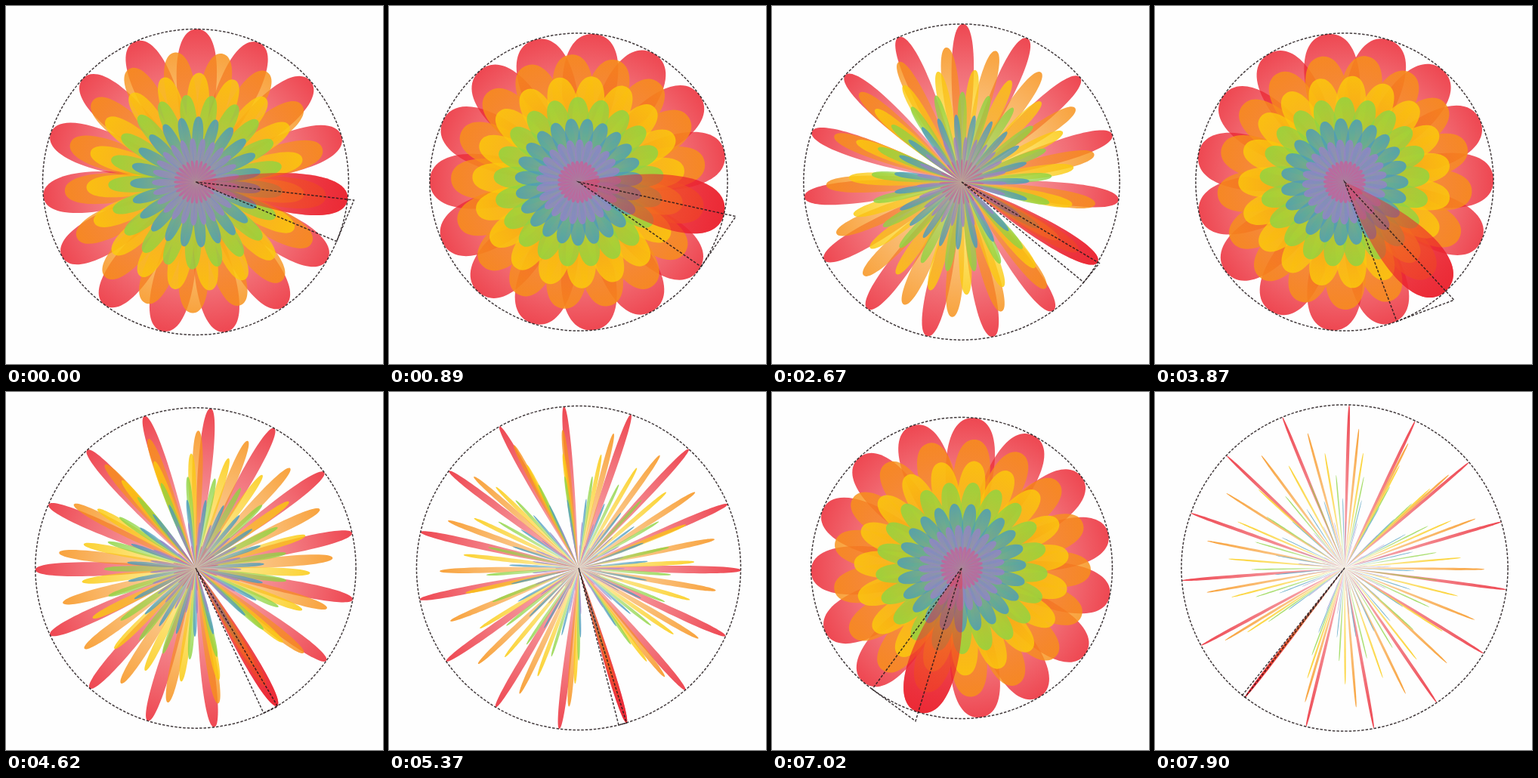
Animation of 499x474 px, one loop 8 s. Source, as an HTML page with a canvas:

```html
<!DOCTYPE html>
<html lang="en">
<head>
<meta charset="utf-8">
<title>Petal wheel</title>
<style>
  html, body { margin: 0; width: 100%; height: 100%; overflow: hidden; background: #fefefe; }
  canvas { display: block; }
</style>
</head>
<body>
<canvas id="stage" width="499" height="474"></canvas>
<script>
const ctx = document.getElementById('stage').getContext('2d');
const RAD = Math.PI / 180;
const LOOP = 8000;

// One colour per layer, outermost first
const COLORS = [
  '235,36,48', '247,145,24', '251,202,12', '142,212,66',
  '72,154,190', '150,130,200', '198,96,152'
];

// Step number at time t: 150 ms steps, a few of them 10 ms shorter
function stepAt(t) {
  const short = [0, 1180, 2370, 7760, 7900].filter(s => t >= s).length;
  return Math.floor((t + 10 * short) / 150);
}

// Teardrop along the x axis, as seen from the wheel's centre
function petal(angle, length, spread, fill) {
  const w = length * Math.tan(spread);
  ctx.save();
  ctx.rotate(angle);
  ctx.beginPath();
  ctx.moveTo(0, 0);
  ctx.bezierCurveTo(.6 * length, .64 * w, length, .56 * w, length, 0);
  ctx.bezierCurveTo(length, -.56 * w, .6 * length, -.64 * w, 0, 0);
  ctx.fillStyle = fill;
  ctx.fill();
  ctx.restore();
}

function fade(rgb, length) {
  const g = ctx.createRadialGradient(0, 0, 0, 0, 0, length);
  [[0, .28], [.4, .5], [.7, .66], [1, .84]]
    .forEach(([at, alpha]) => g.addColorStop(at, `rgba(${rgb},${alpha})`));
  return g;
}

function draw(t) {
  const i = stepAt(t);
  const swing = Math.cos(18 * RAD * (i - 14));
  const radius = 205.8 + 10.8 * swing;
  const spread = (12.6 - 12 * swing) * RAD;
  const turn = (6.55 + .783 * i + .03161 * i * i - 6.2e-5 * i ** 3) * RAD;

  ctx.setTransform(1, 0, 0, 1, 0, 0);
  ctx.fillStyle = '#fefefe';
  ctx.fillRect(0, 0, 499, 474);
  ctx.translate(251, 233);

  COLORS.forEach((rgb, k) => {
    const count = 15 + 2 * k;
    const length = radius * (1 - k / 7);
    const fill = fade(rgb, length);
    for (let j = 0; j < count; j++) {
      petal(turn + 2 * Math.PI * j / count, length, spread * 15 / count, fill);
    }
  });
  petal(turn, radius, spread, fade(COLORS[0], radius));

  ctx.strokeStyle = 'rgba(35,25,28,.85)';
  ctx.lineWidth = 1.5;
  ctx.setLineDash([3.5, 2]);
  ctx.beginPath();
  ctx.arc(0, 0, radius, 0, 2 * Math.PI);
  ctx.stroke();

  // Right triangle: petal axis, tangent to the circle, radius
  const tip = radius / Math.cos(spread);
  ctx.beginPath();
  ctx.moveTo(0, 0);
  ctx.lineTo(tip * Math.cos(turn), tip * Math.sin(turn));
  ctx.lineTo(radius * Math.cos(turn + spread), radius * Math.sin(turn + spread));
  ctx.closePath();
  ctx.stroke();
}

function tick() {
  draw(performance.now() % LOOP);
  requestAnimationFrame(tick);
}
tick();
</script>
</body>
</html>
```
